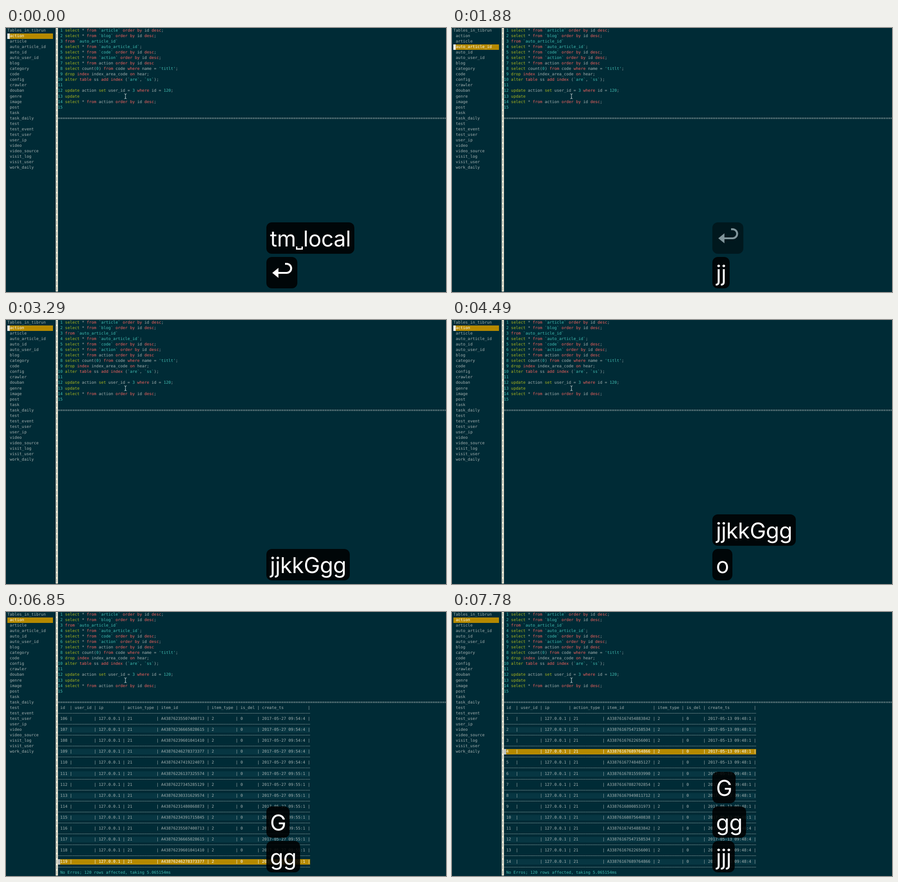
Write an HTML page that moves like this. It is 965 px wide and 580 px high and loops after 8000 ms.

```html
<!DOCTYPE html>
<html lang="en">
<head>
<meta charset="utf-8">
<title>SQL terminal</title>
<style>
  html, body { margin: 0; width: 100%; height: 100%; overflow: hidden; background: #002b36; }
  #stage {
    --w: 5.2757px; --h: 12.06px;
    position: relative; width: 965px; height: 580px; overflow: hidden;
    background: #002b36; color: #a5b1b0;
    font: 8.763px/13.2px "DejaVu Sans Mono", monospace;
    text-rendering: geometricPrecision; font-variant-ligatures: none;
  }
  .cell {
    position: absolute; white-space: pre; height: var(--h);
    left: calc(3px + var(--c) * var(--w)); top: calc(var(--r) * var(--h) - .2px);
  }
  #border { background: #eee8d5; color: #47626a; width: var(--w); height: calc(48 * var(--h)); line-height: var(--h); }
  .stmt { color: #adb81e; }
  .word { color: #f8625e; }
  .lit, .num, .status { color: #42bfb4; }
  .stripe { background: #073642; }
  .sel { background: #b58900; color: #fff; }
  .block { width: var(--w); background: #fff; }
  .block.dim { background: #bcc0bd; }
  #mouse { position: absolute; left: 257px; top: 143px; }
  .key {
    position: absolute; left: 571px; height: 68.5px; padding: 0 8px; box-sizing: border-box;
    border-radius: 12px; background: rgba(0, 0, 0, .86); color: #fff; white-space: pre;
    font: 400 48px/71px Inter, "Open Sans", sans-serif; letter-spacing: -.5px;
  }
  .key.old { opacity: .5; }
  .key svg { display: block; width: 51.5px; height: 68px; overflow: visible; }
  .gap {
    display: inline-block; box-sizing: border-box; width: 15px; height: 7px; margin: 0 1px 0 0;
    border: solid #fff; border-width: 0 3px 3px; vertical-align: -7px;
  }
</style>
</head>
<body>
<div id="stage">
  <div id="text"></div>
  <div id="border" class="cell" style="--c:20;--r:0"></div>
  <div id="list"></div>
  <div id="table"></div>
  <svg id="mouse" width="10" height="14" fill="none">
    <path d="M2.5 1.5Q5 1.5 5 3.5Q5 1.5 7.5 1.5M5 3.5V11M2.5 12.5Q5 12.5 5 10.5Q5 12.5 7.5 12.5" stroke="#e4eaea" stroke-width=".9"/>
  </svg>
  <div id="keys"></div>
</div>
<script>
const $ = id => document.getElementById(id);
const cell = (row, col, html, cls = "") =>
  `<div class="cell ${cls}" style="--c:${col};--r:${row}">${html}</div>`;

const tables = `action article auto_article_id auto_id auto_user_id blog category code config
  crawler douban genre image post task task_daily test test_event test_user user_ip video
  video_source visit_log visit_user work_daily`.split(/\s+/);

const sql = [
  "select * from `article` order by id desc;",
  "select * from `blog` order by id desc;",
  "from `auto_article_id`",
  "select * from `auto_article_id`;",
  "select * from `code` order by id desc;",
  "select * from `action` order by id desc;",
  "select * from action order by id desc",
  "select count(0) from code where name = 'titlt';",
  "drop index index_area_code on hear;",
  "alter table ss add index (`are`, `ss`);",
  "",
  "update action set user_id = 3 where id = 120;",
  "update",
  "select * from action order by id desc;",
  ""
];

const rules = new RegExp([
  "(?<stmt>\\b(?:select|drop|alter|update|set)\\b)",
  "(?<word>\\b(?:from|order|by|desc|where|index|on|table|add)\\b)",
  "(?<lit>`[^`]*`|'[^']*'|\\b\\d+\\b)"
].join("|"), "g");
const paint = line => line.replace(rules, (s, ...rest) => {
  const groups = rest.at(-1);
  return `<span class="${Object.keys(groups).find(k => groups[k])}">${s}</span>`;
});

// Item ids repeat every ten rows
const pages = {
  1: { head: "A33876", day: "2017-05-13 09:48:", turn: 10, secs: ["1", "4"],
    items: "167454883842 167547158534 167622656001 167689764866 167748485127 167815593990 167882702854 167949811712 168008531973 168075640838" },
  106: { head: "A43876", day: "2017-05-27 09:5", turn: 5, secs: ["4:4", "5:1"],
    items: "235507400713 236665028615 239601041410 246278373377 247419224073 226137325574 227345285129 230331629574 231480868873 234391715845" }
};
const widths = [3, 7, 9, 11, 18, 9, 6, 18];
const join = fields => fields.map((f, i) => " " + String(f).padEnd(widths[i]) + " |").join("");
const rule = "—".repeat(105);

function drawList(row, focused) {
  $("list").innerHTML = cell(0, 0, "Tables_in_tibrun") + tables.map((name, i) =>
    cell(i + 1, 0, (" " + name).padEnd(19), i === row ? "sel" : "")).join("") +
    (focused ? cell(row + 1, 0, "", "block") : "");
}

function drawTable(first, row) {
  if (!first) { $("table").innerHTML = ""; return; }
  const { head, day, turn, secs, items } = pages[first];
  const ids = items.split(" ");
  let html = cell(17, 21, join(["id", "user_id", "ip", "action_type", "item_id", "item_type", "is_del", "create_ts"])) +
    cell(18, 21, rule);
  for (let i = 0; i < 14; i++) {
    const line = join([first + i, "", "127.0.0.1", 21, head + ids[i % 10], 2, 0, day + secs[+(i >= turn)]]);
    html += cell(19 + 2 * i, 21, line, i === row ? "sel" : i % 2 ? "stripe" : "") + cell(20 + 2 * i, 21, rule);
  }
  $("table").innerHTML = html + cell(19 + 2 * row, 21, "", "block dim") +
    cell(47, 22, "No Erros; 120 rows affected, taking 5.065154ms", "status");
}

const enter = `<svg viewBox="0 0 51.5 68"><path d="M16 35H36.5A9.9 9.9 0 0 0 36.5 15.2H33" fill="none" stroke="#fff" stroke-width="4.2"/><path d="M5 35L18.5 24V46Z" fill="#fff"/></svg>`;
const glyphs = key => key === "enter" ? enter : key.replace("_", '<i class="gap"></i>');

// The last key sits lowest; a leading ~ marks one on its way out
function drawKeys(keys) {
  const list = keys.split(" ");
  $("keys").innerHTML = list.map((key, i) => {
    const top = 503 - 76 * (list.length - 1 - i);
    return `<div class="key ${key[0] === "~" ? "old" : ""}" style="top:${top}px">${glyphs(key.replace("~", ""))}</div>`;
  }).join("");
}

// Each step keeps whatever it does not change
const steps = [
  [0, { keys: "tm_local enter", list: 0, page: 0, row: 0 }],
  [1190, { keys: "~tm_local enter" }],
  [1400, { keys: "enter j" }],
  [1550, { keys: "enter jj", list: 1 }],
  [1700, { list: 2 }],
  [1880, { keys: "~enter jj" }],
  [2030, { keys: "jjk" }],
  [2180, { keys: "jjkk", list: 0 }],
  [2630, { keys: "jjkkG" }],
  [2840, { list: tables.length - 1 }],
  [3140, { keys: "jjkkGg" }],
  [3290, { keys: "jjkkGgg", list: 0 }],
  [4490, { keys: "jjkkGgg o" }],
  [4700, { page: 1 }],
  [5290, { keys: "~jjkkGgg o" }],
  [5470, { keys: "o" }],
  [6070, { keys: "o G", page: 106, row: 13 }],
  [6520, { keys: "~o G" }],
  [6700, { keys: "G g" }],
  [6850, { keys: "G gg" }],
  [7000, { page: 1, row: 0 }],
  [7450, { keys: "G gg j", row: 1 }],
  [7600, { keys: "G gg jj", row: 2 }],
  [7780, { keys: "G gg jjj", row: 3 }]
];
let last = {};
const states = steps.map(([at, change]) => ({ at, ...(last = { ...last, ...change }) }));

$("text").innerHTML = sql.map((line, i) =>
  cell(i, 21, `<span class="num">${String(i + 1).padStart(2)}</span> ${paint(line)}`)).join("") +
  cell(16, 21, "=".repeat(162));
$("border").textContent = Array(48).fill("|").join("\n");

let shown;
const start = performance.now();
function tick() {
  const t = (performance.now() - start) % 8000;
  const state = states.findLast(s => s.at <= t) || states[0];
  if (state !== shown) {
    shown = state;
    drawList(state.list, !state.page);
    drawTable(state.page, state.row);
    drawKeys(state.keys);
  }
  requestAnimationFrame(tick);
}
tick();
</script>
</body>
</html>
```
